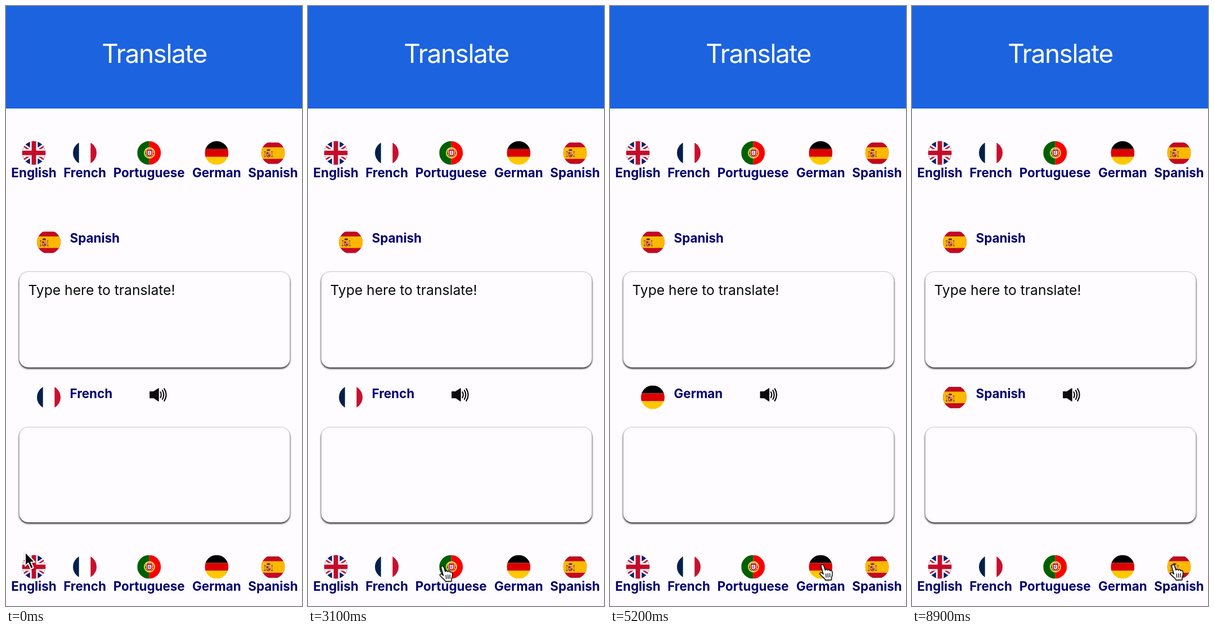
An HTML page that plays this animation: 526 by 1065 pixels, repeating every 9000 ms.

```html
<!DOCTYPE html>
<html lang="en">
<head>
<meta charset="utf-8">
<title>Translate</title>
<style>
  html, body { margin: 0; width: 100%; height: 100%; overflow: hidden; background: #fefcff; }
  svg { display: block; width: 100%; height: 100%; }
  text { font-family: Inter, Roboto, sans-serif; font-optical-sizing: none; }
  .title { font-size: 46px; letter-spacing: -1.5px; fill: #fff; text-anchor: middle; }
  .label { font-size: 22.4px; font-weight: 700; fill: #00006f; }
  .mid { text-anchor: middle; }
  .hint { font-size: 24.65px; fill: #080808; }
  .box { fill: #fefcff; stroke: #b4b3b7; stroke-width: .6; filter: drop-shadow(0 2px 1.5px rgba(0, 0, 0, .9)); }
  .cursor { filter: drop-shadow(0 1px 1px rgba(0, 0, 0, .35)); }
</style>
</head>
<body>
<svg viewBox="0 0 526 1065">
  <defs>
    <clipPath id="round"><circle r="21"/></clipPath>

    <g id="English" clip-path="url(#round)">
      <rect x="-21" y="-21" width="42" height="42" fill="#04216b"/>
      <path d="M-32-21 32 21M-32 21 32-21" stroke="#fff" stroke-width="8.4"/>
      <path d="M-32-21 32 21M-32 21 32-21" stroke="#c8102e" stroke-width="2.8"/>
      <path d="M0-21V21M-21 0H21" stroke="#fff" stroke-width="13.6"/>
      <path d="M0-21V21M-21 0H21" stroke="#c40c2a" stroke-width="8"/>
    </g>

    <g id="French" clip-path="url(#round)">
      <rect x="-10.5" y="-19" width="21" height="38" fill="#fff"/>
      <rect x="-21" y="-19" width="10.7" height="38" fill="#03204b"/>
      <rect x="10.3" y="-19" width="11" height="38" fill="#c8102e"/>
    </g>

    <g id="Portuguese" clip-path="url(#round)">
      <rect x="-21" y="-21" width="21.5" height="42" fill="#006000"/>
      <rect x=".5" y="-21" width="21" height="42" fill="#fb0000"/>
      <g transform="translate(.8)">
        <circle r="9" fill="none" stroke="#f4e53a" stroke-width="1.9"/>
        <path d="M-8.5-2Q0 1 8.5-2M-8 4Q0-1 8 4M0-9V9" fill="none" stroke="#e8d92e" stroke-width="1"/>
        <path d="M-5.5-6.5H5.5V1.5Q5 6.5 0 7.5Q-5 6.5-5.5 1.5Z" fill="#e30613" stroke="#fff" stroke-width=".9"/>
        <path d="M-3.2-3.6H3.2V1.5Q3 4 0 4.8Q-3 4-3.2 1.5Z" fill="#fff"/>
        <path d="M0-2.7V3.7M-2.4.3H2.4" stroke="#16348c" stroke-width="1.4" stroke-dasharray="1.5 1"/>
      </g>
    </g>

    <g id="German" clip-path="url(#round)">
      <rect x="-21" y="-21" width="42" height="14" fill="#000"/>
      <rect x="-21" y="-7" width="42" height="14" fill="#dc0000"/>
      <rect x="-21" y="7" width="42" height="14" fill="#ffc800"/>
    </g>

    <g id="Spanish" clip-path="url(#round)">
      <rect x="-21" y="-18.5" width="42" height="38" fill="#c20a20"/>
      <rect x="-21" y="-10" width="42" height="20.5" fill="#ffb800"/>
      <path d="M-14.5-3V7M-1.8-3V7" stroke="#8f6a4a" stroke-width="1.5" stroke-dasharray="2 1"/>
      <path d="M-16 6.5H-13M-3.3 6.5H-.3M-15.5-2H-13M-3-2H-.8" stroke="#4d3a35" stroke-width="1.3"/>
      <path d="M-12-1.5H-4.3V4.5Q-5 7.5-8.1 8Q-11.5 7.5-12 4.5Z" fill="#b5332a"/>
      <path d="M-8-1.5H-4.5V2.5H-8ZM-11.7 2.5H-8V7Z" fill="#e3b58d"/>
      <path d="M-11.5-3.5-11-6-8.1-7-5.2-6-4.7-3.5Z" fill="#a02c22"/>
      <path d="M-10.5-4.3H-6M-10 1H-9M-7 .3H-5.7M-9 4.5H-7" stroke="#38231f" stroke-width="1.2"/>
    </g>

    <g id="speaker" fill="none" stroke="#0b0b0d" stroke-width="2.2" stroke-linecap="round">
      <path d="M.8-5.3H7.5L16-11V11.2L7.5 5.5H.8Z" fill="#0b0b0d" stroke-width="1.4" stroke-linejoin="round"/>
      <path d="M19.5-4.8Q22.2 0 19.5 5M23-7.8Q27.6 0 23 8M26.3-10.6Q33 0 26.3 10.8"/>
    </g>

    <path id="arrow" class="cursor" d="M0 0V25L5.7 19.8 10 30.2 14.7 28.2 10.3 18.2H17.6Z"
      fill="#050505" stroke="#fff" stroke-width="2" stroke-linejoin="round"/>

    <g id="hand" class="cursor" transform="translate(-5 -1)" stroke="#050505" stroke-width="1.4" stroke-linejoin="round" stroke-linecap="round">
      <path fill="#fff" d="M3 3C2.5 0 6.5-1 7.8 2L10.5 10C11 8 14 8 14.8 10C16 8.3 18.5 8.7 19 11C20.5 9.8 23 11 23 13.5C23.2 18 23.5 19 21.5 23V27L11 27.5C9.5 23.5 3.5 20.5 1 16.5C.5 14 3.5 13.5 5 15L7 17Z"/>
      <path fill="none" stroke-width="1.3" d="M11.7 16.5 12.2 22.5M15.2 16 15.5 22.5M18.7 15.8V22"/>
    </g>
  </defs>

  <rect width="526" height="1065" fill="#fefcff"/>
  <rect width="526" height="182" fill="#1c63e0"/>
  <text class="title" x="263.5" y="100.5">Translate</text>

  <g id="row"></g>
  <use href="#row" y="734.7"/>

  <use href="#Spanish" x="76" y="419"/>
  <text class="label" x="113.5" y="419.5">Spanish</text>
  <rect class="box" x="23.5" y="471.5" width="481" height="170" rx="16"/>
  <text class="hint" x="39.5" y="512.5">Type here to translate!</text>

  <use id="flag" x="76" y="694.5"/>
  <text id="name" class="label" x="113.5" y="695.5"></text>
  <use id="sound" href="#speaker" y="690"/>
  <rect class="box" x="23.5" y="747.5" width="481" height="169" rx="16"/>

  <use id="pointer"/>
</svg>
<script>
  const LOOP = 9000, STEP = 100;
  const $ = id => document.getElementById(id);

  // centre of each menu entry and place of the speaker beside its name
  const langs = {
    English: { x: 49.5, sound: 260 },
    French: { x: 140, sound: 255 },
    Portuguese: { x: 254.2, sound: 307.5 },
    German: { x: 374.3, sound: 266.5 },
    Spanish: { x: 474.5, sound: 268 }
  };
  const picks = [
    [0, 'French'], [1000, 'English'], [2400, 'French'],
    [3500, 'Portuguese'], [4900, 'German'], [6400, 'Spanish']
  ];
  // time, x, y of the pointer tip
  const path = [
    [0, 34, 969], [200, 34, 969], [600, 42, 993], [1300, 42, 993],
    [1900, 127.5, 997], [2500, 127.5, 997], [3000, 238.5, 995], [3800, 238.5, 995],
    [4400, 377, 992.5], [5200, 377, 992.5], [5800, 463.5, 992.5], [LOOP, 463.5, 992.5]
  ];

  $('row').innerHTML = Object.entries(langs).map(([name, { x }]) =>
    `<use href="#${name}" x="${x}" y="260.8"/><text class="label mid" x="${x}" y="303.5">${name}</text>`
  ).join('');

  function tipAt(t) {
    const i = path.findIndex(p => p[0] > t);
    const [t0, x0, y0] = path[i - 1], [t1, x1, y1] = path[i];
    const u = (t - t0) / (t1 - t0), k = u * u * (3 - 2 * u);
    return [x0 + (x1 - x0) * k, y0 + (y1 - y0) * k];
  }

  function draw(ms) {
    const t = Math.floor((ms % LOOP) / STEP) * STEP;
    const lang = picks.filter(p => p[0] <= t).pop()[1];
    $('flag').setAttribute('href', '#' + lang);
    $('name').textContent = lang;
    $('sound').setAttribute('x', langs[lang].sound);

    const [x, y] = tipAt(t);
    const over = y > 975 && Object.values(langs).some(l => Math.abs(l.x - x) < 21);
    $('pointer').setAttribute('href', over ? '#hand' : '#arrow');
    $('pointer').setAttribute('transform', `translate(${x} ${y})`);
  }

  const start = performance.now();
  function tick() {
    draw(performance.now() - start);
    requestAnimationFrame(tick);
  }
  tick();
</script>
</body>
</html>
```
